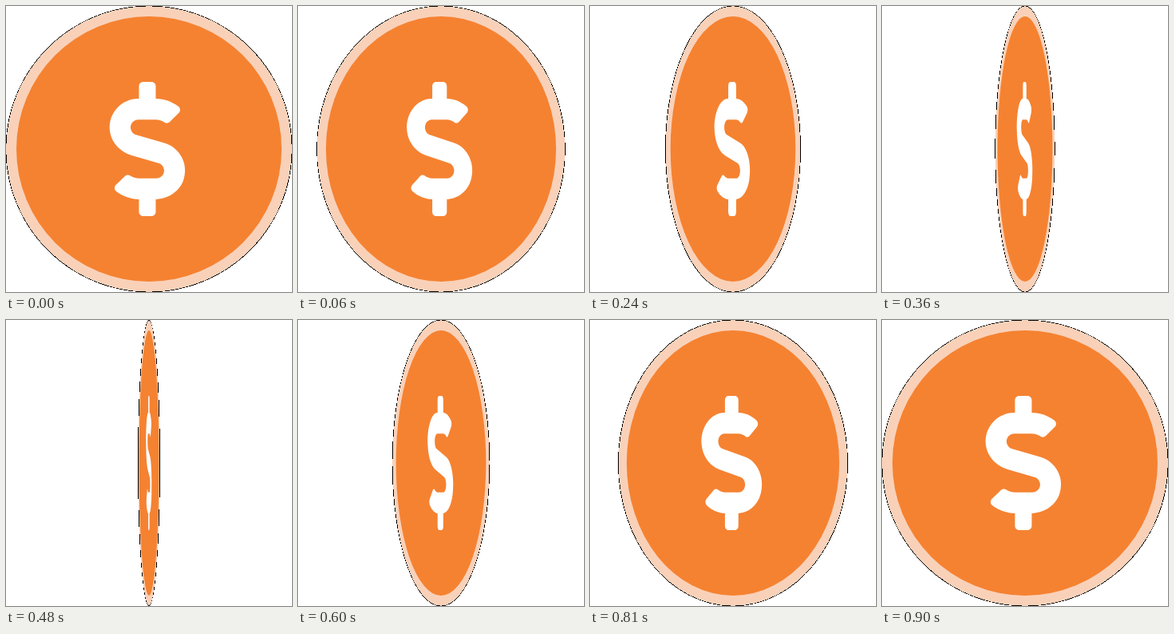
An HTML page for the animation above (1000 ms loop, 358 by 358 pixels).

```html
<!DOCTYPE html>
<html lang="en">
<head>
<meta charset="utf-8">
<title>Spinning coin</title>
<style>
  html, body { margin: 0; width: 100%; height: 100%; overflow: hidden; background: #fff; }
  svg { display: block; width: 100vw; height: 100vh; }
</style>
</head>
<body>
<svg viewBox="0 0 358 358">
  <g shape-rendering="crispEdges">
    <ellipse id="edge" cx="179" cy="179" ry="179.4" fill="#000"/>
    <ellipse id="rim" cx="179" cy="179" ry="178.7" fill="#f9d1b9"/>
  </g>
  <g id="face">
    <circle cx="179" cy="179" r="166" fill="#f58231"/>
    <path fill="#fff" transform="translate(129.7 95) scale(.328)" d="M209.2 233.4l-108-31.6C88.7 198.2 80 186.5 80 173.5c0-16.3 13.2-29.5 29.5-29.5h66.3c12.2 0 24.2 3.7 34.2 10.5 6.1 4.1 14.3 3.1 19.5-2l34.8-34c7.1-6.9 6.1-18.4-1.8-24.5C238 74.8 207.4 64.1 176 64V16c0-8.8-7.2-16-16-16h-32c-8.8 0-16 7.2-16 16v48h-2.5C45.8 64-5.4 118.7.5 183.6c4.2 46.1 39.4 83.6 83.8 96.6l102.5 30c12.5 3.7 21.2 15.3 21.2 28.3 0 16.3-13.2 29.5-29.5 29.5h-66.3C100 368 88 364.3 78 357.5c-6.1-4.1-14.3-3.1-19.5 2l-34.8 34c-7.1 6.9-6.1 18.4 1.8 24.5 24.5 19.2 55.1 29.9 86.5 30v48c0 8.8 7.2 16 16 16h32c8.8 0 16-7.2 16-16v-48.2c46.6-.9 90.3-28.6 105.7-72.7 21.5-61.6-14.6-124.8-72.5-141.7z"/>
  </g>
</svg>
<script>
  const LOOP = 1000, STEP = 30, HALF = 15, SIZE = 358, SHRINK = 23.65;
  const [edge, rim, face] = ['edge', 'rim', 'face'].map(id => document.getElementById(id));

  // The coin narrows linearly for 15 steps, widens for 15, then rests.
  function draw(ms) {
    const step = Math.min(Math.floor((ms % LOOP) / STEP), 2 * HALF);
    const width = SIZE - SHRINK * (HALF - Math.abs(step - HALF));
    edge.setAttribute('rx', width / 2 + 0.5);
    rim.setAttribute('rx', width / 2 - 0.2);
    face.setAttribute('transform', `translate(179 0) scale(${width / SIZE} 1) translate(-179 0)`);
  }

  const start = performance.now();
  function tick() {
    draw(performance.now() - start);
    requestAnimationFrame(tick);
  }
  tick();
</script>
</body>
</html>
```
